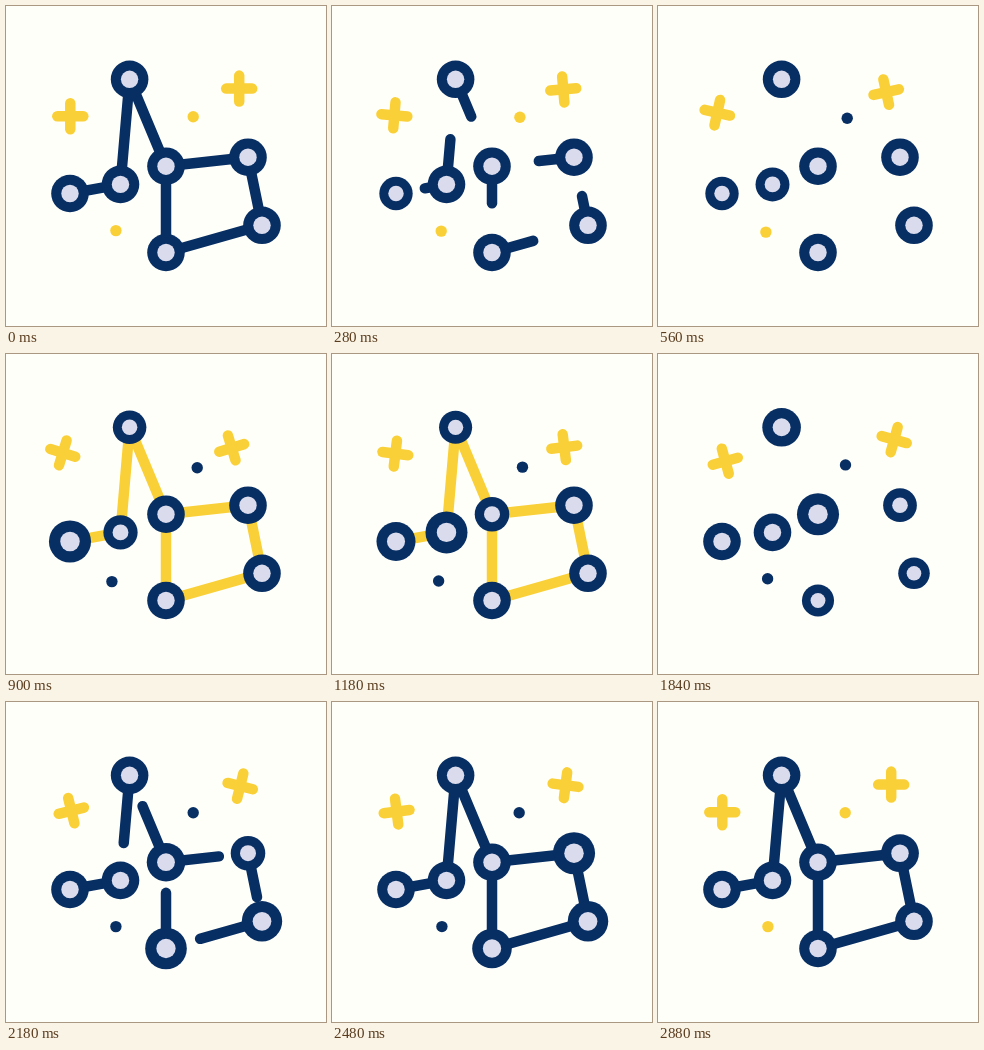
Recreate the animation shown at these times as an HTML page with a canvas. Size 320 px wide and 320 px high, loop 2.9 s.

```html
<!DOCTYPE html>
<html lang="en">
<head>
<meta charset="utf-8">
<title>Constellation</title>
<style>
html, body { margin: 0; width: 100%; height: 100%; overflow: hidden; background: #fffffa; }
canvas { display: block; width: 320px; height: 320px; }
</style>
</head>
<body>
<canvas id="stage"></canvas>
<script>
const LOOP = 2900;
const NAVY = '#082f63', YELLOW = '#fad038', PALE = '#dadcee', PAPER = '#fffffa';

// x, y, start of the pulse
const stars = {
  a: [123.6, 73.3, 630], b: [114.5, 178.4, 310], c: [64, 187.5, 0], d: [160, 160.2, 960],
  e: [242, 151.2, 1580], f: [256, 219.3, 1400], g: [160, 246.5, 1340]
};
const links = ['cb', 'ab', 'da', 'de', 'gd', 'ef', 'fg'];

const times = [0, 560, 900, 1460, 1840, 2180, LOOP];
const drift = {
  x: [0, -5, -7.5, 5.5, 3, 1, 0],
  y: [0, 3.5, 11.3, 8, 3, 1.5, 0],
  turn: [0, 12.5, 17, -5, -15.5, -14, 0],
  dot: [0, 2, 4, 2, 0.3, 0, 0]
};

const canvas = document.getElementById('stage');
const ctx = canvas.getContext('2d');
const ratio = window.devicePixelRatio || 1;
canvas.width = canvas.height = 320 * ratio;

const ease = p => p * p * (3 - 2 * p);
const ramp = (t, from, to) => ease(Math.min(1, Math.max(0, (t - from) / (to - from))));

// Smooth curve through the points of a track
function follow(track, t) {
  let i = 0;
  while (i < times.length - 2 && t >= times[i + 1]) i++;
  const slope = k => k === 0 || k === times.length - 1 ? 0
    : (track[k + 1] - track[k - 1]) / (times[k + 1] - times[k - 1]);
  const span = times[i + 1] - times[i], p = (t - times[i]) / span, q = 1 - p;
  return track[i] * (1 + 2 * p) * q * q + track[i + 1] * p * p * (3 - 2 * p)
    + span * p * q * (slope(i) * q - slope(i + 1) * p);
}

function pulse(t) {
  return 1 - 0.16 * ramp(t, 0, 440) + 0.28 * ramp(t, 440, 900) - 0.12 * ramp(t, 900, 1350);
}

function disc(x, y, r, color) {
  ctx.fillStyle = color;
  ctx.beginPath();
  ctx.arc(x, y, r, 0, 2 * Math.PI);
  ctx.fill();
}

function stroke(x1, y1, x2, y2) {
  ctx.beginPath();
  ctx.moveTo(x1, y1);
  ctx.lineTo(x2, y2);
  ctx.stroke();
}

function drawLinks(t) {
  const yellow = t >= 480 && t < 1820;
  let from, to;
  if (yellow) {
    from = ramp(t, 1310, 1760);
    to = ramp(t, 490, 890);
  } else {
    from = t < 480 ? ramp(t, 40, 480) : 0;
    to = t < 480 ? 1 : ramp(t, 1930, 2350);
  }
  if (from >= to) return;
  ctx.strokeStyle = yellow ? YELLOW : NAVY;
  for (const [start, end] of links) {
    const [x, y] = stars[start], [u, v] = stars[end];
    stroke(x + (u - x) * from, y + (v - y) * from, x + (u - x) * to, y + (v - y) * to);
  }
}

function drawCross(x, y, side, t) {
  ctx.save();
  ctx.translate(x + follow(drift.x, t), y + side * follow(drift.y, t));
  ctx.rotate(-side * follow(drift.turn, t) * Math.PI / 180);
  ctx.strokeStyle = YELLOW;
  stroke(-13, 0, 13, 0);
  stroke(0, -13, 0, 13);
  ctx.restore();
}

function drawDot(x, y, side, firstSwitch, t) {
  const shift = follow(drift.dot, t);
  const navy = (t >= firstSwitch && t < 1200) || (t >= 1640 && t < 2560);
  disc(x + side * shift, y + 0.75 * shift, 5.7, navy ? NAVY : YELLOW);
}

function draw(t) {
  ctx.setTransform(ratio, 0, 0, ratio, 0, 0);
  ctx.fillStyle = PAPER;
  ctx.fillRect(0, 0, 320, 320);
  ctx.lineWidth = 10.5;
  ctx.lineCap = 'round';
  drawLinks(t);
  for (const [x, y, start] of Object.values(stars)) {
    const scale = pulse(t - start);
    disc(x, y, 18.8 * scale, NAVY);
    disc(x, y, 8.7 * scale, PALE);
  }
  drawCross(64.3, 110.2, -1, t);
  drawCross(233.2, 82.6, 1, t);
  drawDot(187.2, 110.7, 1, 400, t);
  drawDot(109.9, 224.6, -1, 700, t);
}

let began;
function tick() {
  const now = performance.now();
  began ??= now;
  draw((now - began) % LOOP);
  requestAnimationFrame(tick);
}
tick();
</script>
</body>
</html>
```
